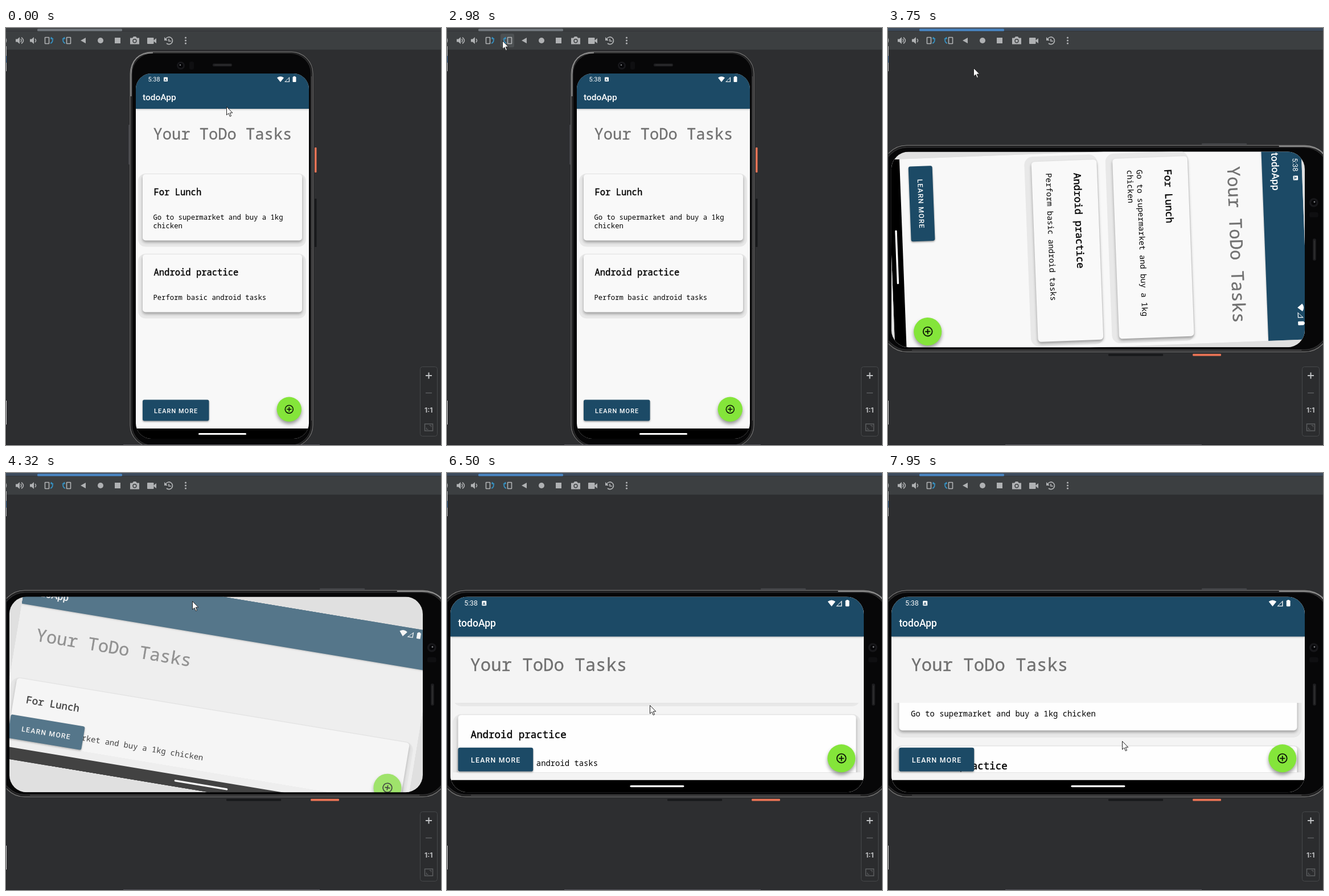
Recreate the animation shown at these times as an HTML page with a canvas. Size 764x733 px, loop 8 s.

```html
<!DOCTYPE html>
<html lang="en">
<head>
<meta charset="utf-8">
<title>Rotating a todo app</title>
<style>
  html, body { margin: 0; width: 100%; height: 100%; overflow: hidden; background: #2d2e30; }
  canvas { display: block; }
</style>
</head>
<body>
<canvas id="stage" width="764" height="733"></canvas>
<script>
const ctx = document.getElementById('stage').getContext('2d');
const LOOP = 8000, ZOOM = 1.131, TURN = 3230;
const MONO = '"Noto Sans Mono", monospace', SANS = 'Roboto, sans-serif';
const NAVY = '#1c4a66', GREY = '#afb1b3', BLUE = '#3592c4';

// Screen updates come in bursts: [start, interval, count]
const BURSTS = [[0, 1, 1], [430, 150, 2], [1010, 190, 3], [1990, 141, 8], [TURN, 1, 1],
  [3500, 164, 6], [4440, 1, 1], [4710, 131, 8], [5760, 123, 7], [6620, 150, 2],
  [6890, 131, 8], [7950, 1, 1]];

// Keys: [time, value, ...]
const CURSOR = [[0, 387, 138], [429, 387, 138], [430, 372, 114], [580, 364, 119], [1390, 356, 119],
  [1990, 335, 112], [2550, 120, 30], [2700, 84, 24], [2970, 97, 22], [TURN, 97, 22], [3500, 100, 26],
  [3664, 150, 70], [4320, 327, 225], [4440, 327, 225], [4710, 320, 250], [5200, 335, 400],
  [5630, 354, 426], [5760, 354, 420], [6130, 360, 315], [6374, 352, 372], [6498, 356, 408],
  [6770, 362, 450], [7021, 368, 529], [7283, 372, 400], [7414, 374, 342], [7800, 342, 517], [7950, 411, 471]];
const SCROLL = [[5630, 0], [5760, 6], [6130, 111], [6252, 160], [6374, 160], [6498, 135],
  [6770, 92], [7021, 20], [7152, 20], [7414, 135], [7800, 80]];
const ANGLE = [[3500, 90], [3800, 86], [4000, 58], [4156, 28], [4320, 9.45], [4440, 0]];
const OLD_ALPHA = [[3664, 1], [4100, 0]];
const NEW_ALPHA = [[3800, 0], [4320, 0.705], [4440, 1]];

function at(keys, t, n = 1) {
  const i = keys.findIndex(k => k[0] > t);
  if (i < 0) return keys[keys.length - 1][n];
  if (i === 0) return keys[0][n];
  const a = keys[i - 1], b = keys[i];
  return a[n] + (b[n] - a[n]) * (t - a[0]) / (b[0] - a[0]);
}

function lastUpdate(t) {
  const [start, gap, count] = BURSTS.filter(b => b[0] <= t).pop();
  return start + gap * Math.min(count - 1, Math.floor((t - start) / gap));
}

function box(x, y, w, h, r, color) {
  ctx.beginPath();
  ctx.roundRect(x, y, w, h, r);
  ctx.fillStyle = color;
  ctx.fill();
}

function outline(x, y, w, h, r, color, width = 1) {
  ctx.beginPath();
  ctx.roundRect(x, y, w, h, r);
  ctx.strokeStyle = color;
  ctx.lineWidth = width;
  ctx.stroke();
}

function disc(x, y, r, color) { box(x - r, y - r, 2 * r, 2 * r, r, color); }

function fillPath(d, color) { ctx.fillStyle = color; ctx.fill(new Path2D(d)); }

function strokePath(d, color, width = 1.5) {
  ctx.strokeStyle = color;
  ctx.lineWidth = width;
  ctx.stroke(new Path2D(d));
}

function text(s, x, y, font, color, weight = 0, spacing = 0) {
  ctx.font = font;
  ctx.letterSpacing = spacing + 'px';
  ctx.fillStyle = ctx.strokeStyle = color;
  ctx.fillText(s, x, y);
  if (weight) { ctx.lineWidth = weight; ctx.strokeText(s, x, y); }
}

function local(draw) { ctx.save(); draw(); ctx.restore(); }

function shadowed(blur, dy, color, draw) {
  local(() => {
    ctx.shadowBlur = blur;
    ctx.shadowOffsetY = dy;
    ctx.shadowColor = color;
    draw();
  });
}

function card(y, w, title, lines, color) {
  const h = 86.5 + 15 * lines.length;
  box(4, y - 1, w - 9, h + 12, 13, '#e8e8e8');
  shadowed(5, 3, '#0005', () => box(12, y, w - 24, h, 5, color));
  text(title, 31.5, y + 36.5, `15.5px ${MONO}`, '#000', 0.4);
  lines.forEach((line, i) => text(line, 30.4, y + 79.5 + 15 * i, `12.28px ${MONO}`, '#000'));
  return y + h + 24.5;
}

function statusBar(w) {
  text('5:38', 21.5, 14, `10.9px ${SANS}`, '#fff');
  box(49, 6.5, 7, 7.5, 1, '#fff');
  text('A', 50.3, 12.6, `bold 6px ${SANS}`, NAVY);
  local(() => {
    ctx.translate(w, 0);
    fillPath('M-56 7.5Q-50 3-44 7.5L-50 15ZM-43 15L-34 6V15Z', '#fff');
    fillPath('M-41 13.9L-35.2 8.1V13.9Z', NAVY);
    box(-28.5, 5.8, 6, 9.2, 1, '#fff');
    box(-27, 4.8, 3, 2, 0.5, '#fff');
  });
}

// The app in its own units, centred on the current origin; bottom is where the navigation bar begins
function app(w, h, bottom, scroll, background, cardColor, lunch) {
  local(() => {
    ctx.translate(-w / 2, -h / 2);
    ctx.beginPath();
    ctx.rect(0, 0, w, h);
    ctx.clip();
    box(0, 0, w, h, 0, background);
    local(() => {
      ctx.beginPath();
      ctx.rect(0, 165, w, bottom - 12 - 165);
      ctx.clip();
      const next = card(177 - scroll, w, 'For Lunch', lunch, cardColor);
      card(next, w, 'Android practice', ['Perform basic android tasks'], cardColor);
    });
    shadowed(3, 1, '#0004', () => box(0, 0, w, 62, 0, NAVY));
    statusBar(w);
    text('todoApp', 12, 46.7, `500 15.5px ${SANS}`, '#fff');
    text('Your ToDo Tasks', 30.5, 115.7, `27.1px ${MONO}`, '#707070', 0.3);

    shadowed(3, 1.5, '#0006', () => box(12, bottom - 50.5, 116.5, 37, 3, NAVY));
    text('LEARN MORE', 32, bottom - 27, `500 10.85px ${SANS}`, '#fff', 0, 1.1);

    const x = w - 34.7, y = bottom - 33.8;
    shadowed(6, 4, '#0006', () => disc(x, y, 21.7, '#84e53a'));
    outline(x - 7, y - 7, 14, 14, 7, '#0b1405', 1.6);
    strokePath(`M${x - 4} ${y}h8M${x} ${y - 4}v8`, '#0b1405', 1.6);

    box(0, bottom, w, h - bottom, 0, '#000');
    box(w / 2 - 42, bottom + 8, 84, 3, 1.5, '#fff');
  });
}

function portraitApp() {
  app(304, 642, 624, 0, '#f8f8f8', '#f9f9f9', ['Go to supermarket and buy a 1kg', 'chicken']);
}

function landscapeApp(scroll) {
  app(642, 304, 285, scroll / ZOOM, '#f4f4f4', '#fefefe', ['Go to supermarket and buy a 1kg chicken']);
}

function phoneShell() {
  box(215, 170, 4, 70, 1, '#45464a');
  box(542, 300, 3.5, 85, 1, '#17181a');
  box(542, 210, 3.5, 44, 1, '#ec7456');
  box(217, 41, 323, 696, 39, '#1b1b1c');
  outline(218, 42, 321, 694, 38, '#6b6b6b', 1.4);
  outline(221, 44.5, 315, 689, 36, '#2c2c2d', 1.5);
  box(222, 45, 313, 688, 35, '#070708');
  strokePath('M219.5 120V82Q219.5 43.5 258 43.5', '#8a8a8a', 2);
  strokePath('M536.5 85V690', '#555', 1);
  disc(307, 66, 7, '#17171a');
  disc(307, 66, 4, '#050507');
  disc(306, 65, 1.3, '#77797d');
  box(322, 59, 8, 14, 3, '#0f0f11');
  box(363, 62.5, 34, 5, 2, '#1e1e20');
  strokePath('M366 65H395', '#39393b', 1);
  box(228, 80, 304, 642, 27, '#000');
}

function phone(t) {
  const landscape = t >= TURN;
  local(() => {
    if (landscape) ctx.transform(0, ZOOM, -ZOOM, 0, 732 + 80 * ZOOM, 217.5 - 228 * ZOOM);
    phoneShell();
    ctx.beginPath();
    ctx.roundRect(228, 80, 304, 642, 27);
    ctx.clip();
    ctx.translate(380, 401);
    if (!landscape) return portraitApp();
    if (t < 3500) return;
    box(-152, -321, 304, 642, 0, '#e0e0e0');
    ctx.rotate((at(ANGLE, t) - 90) * Math.PI / 180);
    fade(at(OLD_ALPHA, t), portraitApp);
    fade(at(NEW_ALPHA, t), () => landscapeApp(at(SCROLL, t)));
  });
}

// Fades a drawing as one layer, so that its overlapping parts do not show through
const layer = new OffscreenCanvas(764, 733).getContext('2d');
function fade(alpha, draw) {
  if (alpha >= 1) return draw();
  if (alpha <= 0) return;
  const matrix = ctx.getTransform();
  layer.resetTransform();
  layer.clearRect(0, 0, 764, 733);
  layer.setTransform(matrix);
  withContext(layer, draw);
  local(() => {
    ctx.resetTransform();
    ctx.globalAlpha = alpha;
    ctx.drawImage(layer.canvas, 0, 0);
  });
}

function withContext(other, draw) {
  const names = ['save', 'restore', 'translate', 'beginPath', 'rect', 'roundRect', 'clip',
    'fill', 'stroke', 'fillText', 'strokeText'];
  const props = ['font', 'letterSpacing', 'fillStyle', 'strokeStyle', 'lineWidth',
    'shadowBlur', 'shadowOffsetY', 'shadowColor'];
  for (const n of names) ctx[n] = other[n].bind(other);
  for (const p of props)
    Object.defineProperty(ctx, p, { configurable: true, get: () => other[p], set: v => { other[p] = v; } });
  draw();
  for (const n of [...names, ...props]) delete ctx[n];
}

const SPEAKER = 'M-6-2.5h3L1-6V6L-3 2.5h-3Z';
const ICONS = {
  '-4': () => strokePath('M2-6Q7 0 2 6', GREY),
  23: () => { fillPath(SPEAKER, GREY); strokePath('M3-3Q5 0 3 3M4-5.5Q11 0 4 5.5', GREY); },
  48: () => { fillPath(SPEAKER, GREY); strokePath('M3-3Q6 0 3 3', GREY); },
  76: () => rotateIcon(1),
  106: () => rotateIcon(-1),
  136: () => fillPath('M-5 0L4-5V5Z', GREY),
  166: () => disc(0, 0, 5, GREY),
  196: () => box(-5, -5, 10, 10, 0, GREY),
  226: () => {
    fillPath('M-8-4.5h4l2-2.5h4l2 2.5h4V6.5H-8Z', GREY);
    disc(0, 0.8, 3.7, '#3c3f41');
    disc(0, 0.8, 2.3, GREY);
  },
  256: () => { box(-8, -5, 11.5, 11, 1, GREY); fillPath('M3 0L8-4V5L3 1Z', GREY); },
  286: () => {
    strokePath('M-5.5-2.5A6.3 6.3 0 1 1-4 5M0-3V1H4', GREY, 1.7);
    fillPath('M-8-6V0h6Z', GREY);
  },
  315: () => [-5, 0, 5].forEach(y => disc(0.5, y, 1.6, GREY))
};

function rotateIcon(side) {
  ctx.scale(side, 1);
  outline(-7.5, -5.5, 7, 11, 0.5, GREY, 1.6);
  strokePath('M2 5Q7 3 5.5-3', BLUE, 1.8);
  fillPath('M2-2.5L3-6.5L8-2.5Z', BLUE);
}

function toolbar(focused, x, y) {
  box(0, 0, 764, 38, 0, '#3c3f41');
  box(0, 0, 764, 5, 0, focused ? '#3d4b5c' : '#3c3f41');
  box(0, 5, 764, 1, 0, '#323437');
  box(55, 1.5, 149, 4, 1.5, focused ? '#4a88c7' : '#747a80');
  for (const [pos, draw] of Object.entries(ICONS)) local(() => {
    ctx.translate(+pos, 22);
    if (Math.abs(x - pos) < 12 && Math.abs(y - 22) < 12) box(-12, -12, 24, 24, 3, '#4c5052');
    draw();
  });
}

function zoomPanel() {
  box(727, 595, 31, 123, 4, '#2b2c2e');
  outline(727.5, 595.5, 30, 122, 4, '#46484a');
  strokePath('M737 611h11M742.5 605.5v11', '#c0c2c4', 2);
  strokePath('M737 641.5h11', '#5c5e60', 1.5);
  text('1:1', 735, 675.5, 'bold 12px Inter, sans-serif', '#c0c2c4');
  outline(735.5, 696, 14, 12, 0, '#5c5e60', 1.5);
  strokePath('M738.5 705.5v-3M738.5 705.5h3M746.5 698.5v3M746.5 698.5h-3', '#5c5e60', 1);
}

function edges() {
  box(0, 38, 1, 695, 0, '#232426');
  box(0, 32, 1, 44, 0, '#b9babb');
  box(0, 49, 1, 12, 0, '#3f6da0');
  box(0, 655, 1, 42, 0, '#d5d5d5');
  box(0, 732, 764, 1, 0, '#222327');
  box(206, 732, 345, 1, 0, '#55545c');
}

function cursor(x, y) {
  local(() => {
    ctx.translate(x + 0.5, y + 0.5);
    const arrow = 'M0 0V14.5L3.4 11.4L5.8 17L8 16L5.7 10.6H10.3Z';
    fillPath(arrow, '#fff');
    strokePath(arrow, '#222', 1);
  });
}

function frame(now) {
  const t = lastUpdate(now % LOOP);
  const x = at(CURSOR, t), y = at(CURSOR, t, 2);
  box(0, 0, 764, 733, 0, '#2d2e30');
  phone(t);
  toolbar(t >= TURN, x, y);
  zoomPanel();
  edges();
  cursor(x, y);
  requestAnimationFrame(() => frame(performance.now()));
}
frame(performance.now());
</script>
</body>
</html>
```
